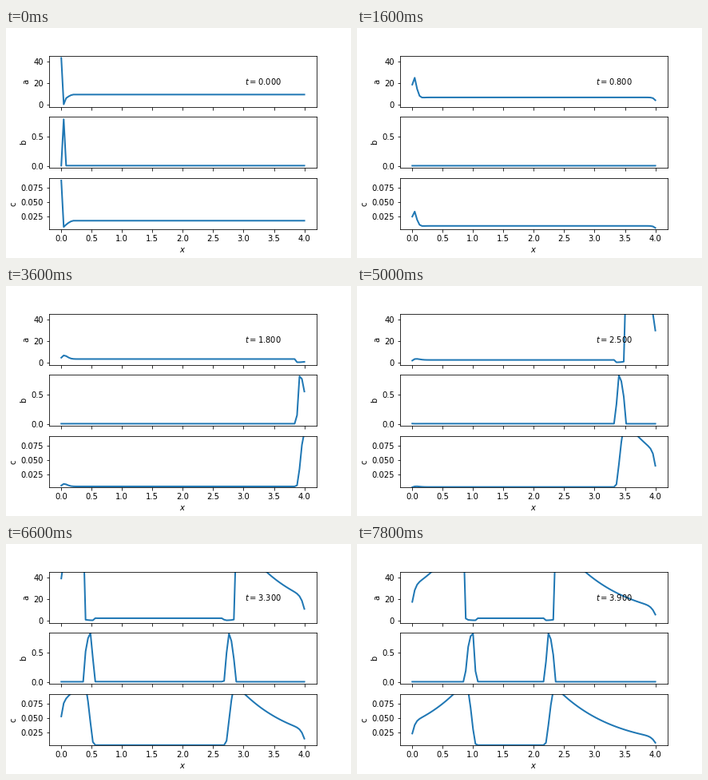
A matplotlib script for the animation above (8 s loop, 432 by 288 pixels).

```python
import numpy as np
import matplotlib.pyplot as plt
from matplotlib.animation import FuncAnimation

# Three-variable excitable medium on a line: a follows b and c, b travels as
# pulses from the leaking ends, c is produced by b, decays and diffuses.
F, Q = 3.0, 0.002
REST = Q * (F + 1) / (F - 1)
FRAMES, STEP, SUB = 40, 0.1, 20
LEAK = 0.83  # diffusion rate between neighbouring grid points

x = np.linspace(0, 4, 101)


def pulse(d, width=0.184):
    """Height at distance d behind the leading edge: steep rise, slow fall."""
    s = np.clip(d / width, 0, 1)
    rise = 1 / (1 + np.exp((0.04 - d) / 0.009))
    return np.where(d > 0, 0.89 * rise * (1 - s ** 3) ** 0.7, 0)


def travel(t, start, speed, gain):
    """Distance covered by a slowly accelerating front."""
    t = max(t - start, 0)
    return speed * t + gain * t * t


def pulses(t):
    right = 4 - travel(t, 1.6, 0.72, 0.034)
    left = travel(t, 2.62, 0.806, 0.022)
    p = pulse(x - right) + pulse(left - x, 0.195)
    p[1] += pulse(0.09 + 0.5 * t)
    return p


def background(c):
    """Small value of b that balances a given c outside the pulses."""
    k = F * c / Q
    y = (1 + k + np.sqrt(np.maximum((1 + k) ** 2 - 8 * k, 0))) / 4
    y = np.maximum(y, 1.7)
    return Q * y / (y - 1)


def follow(b, c):
    return F * c / (Q + b)


def solve():
    c = 0.0183 - 0.0106 * np.clip((0.2 - x) / 0.16, 0, 1) ** 1.6
    c[0] = 0.0866
    b = np.full(x.size, REST)
    b[1] = 0.8
    rows = [(follow(b, c), b, c)]
    dt = STEP / SUB
    for n in range(1, FRAMES):
        for s in range(SUB):
            t = (n - 1) * STEP + s * dt
            wide = np.pad(c, 1)
            spread = LEAK * (wide[:-2] - 2 * c + wide[2:])
            c = c + dt * (background(c) + pulses(t) - c + spread)
        b = background(c) + pulses(n * STEP)
        rows.append((follow(b, c), b, c))
    return rows


rows = solve()

fig, axes = plt.subplots(3, 1, sharex=True, figsize=(6, 4), dpi=72)
fig.subplots_adjust(left=0.125, right=0.9, bottom=0.125, top=0.88, hspace=0.2)

# the axes keep the limits that fit the first state
lines = []
for ax, name, data in zip(axes, "abc", rows[0]):
    lines += ax.plot(x, data, color="#1f77b4", lw=2)
    ax.set_ylabel(name)
    ax.set_ylim(ax.get_ylim())
axes[2].set_xlabel("$x$")
clock = axes[0].text(0.8, 0.5, "", transform=axes[0].transAxes,
                     ha="center", va="center")


def draw(n):
    for line, data in zip(lines, rows[n]):
        line.set_ydata(data)
    clock.set_text(f"$t = {n * STEP:.3f}$")
    return [*lines, clock]


anim = FuncAnimation(fig, draw, frames=FRAMES, interval=200, repeat=True,
                     repeat_delay=0)
plt.show()
```
